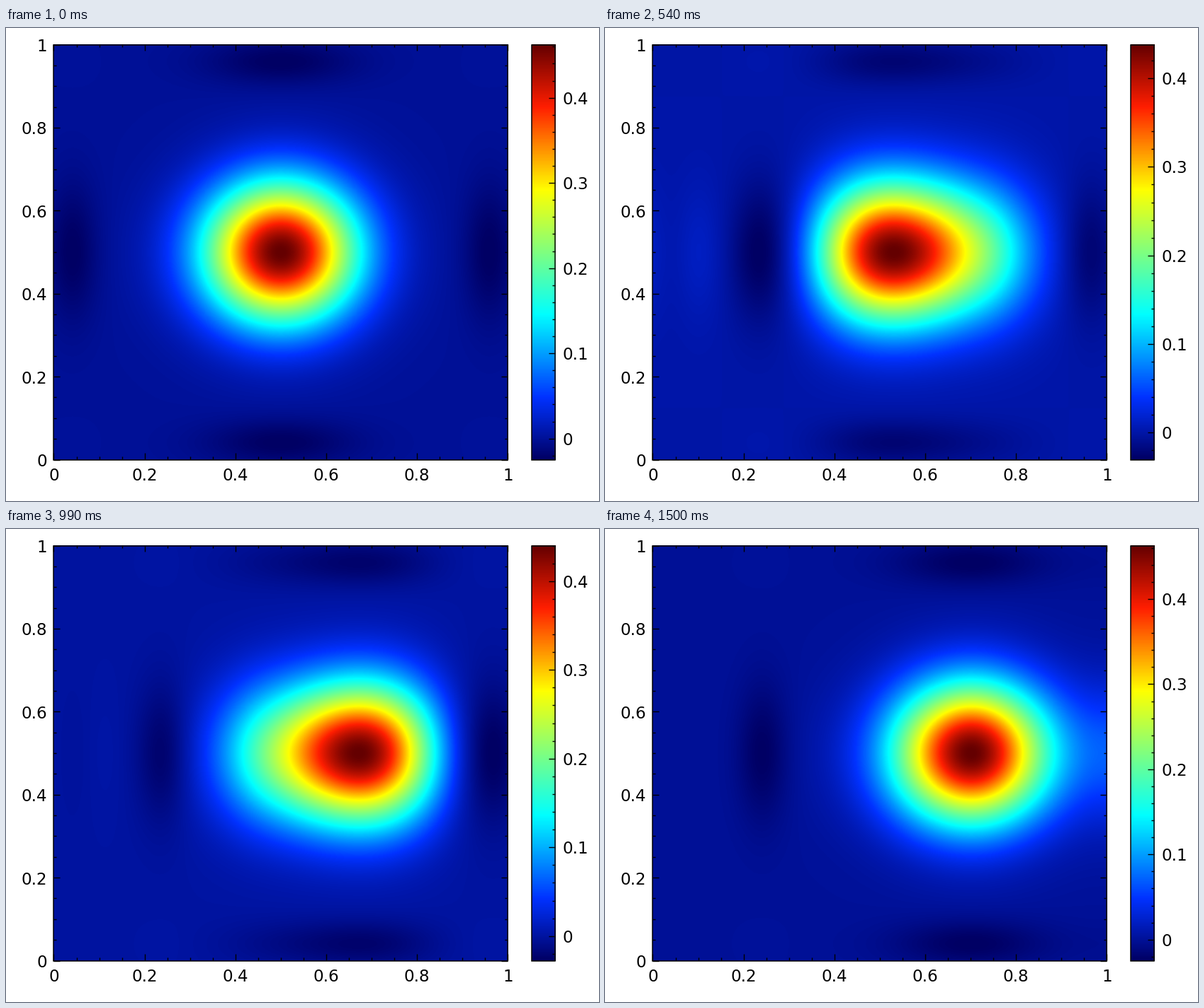
These frames come from a looping animation (837 by 669 pixels, 1530 ms). A matplotlib script:

```python
import numpy as np
import matplotlib.pyplot as plt
from matplotlib.animation import FuncAnimation
from matplotlib.collections import LineCollection
from matplotlib.colors import LinearSegmentedColormap
from matplotlib.patches import Rectangle

W, H, DPI = 837, 669, 64
PX = 72 / DPI                       # one pixel in points
LEFT, RIGHT, TOP, BOTTOM = 67, 708, 23, 610
BAR_L, BAR_R = 742, 775
TICKS, PICTURES = 51, 33
SPACING, AMPLITUDE = 0.2, 0.68

# Pictures are held for one or two ticks of 30 ms.
STARTS = np.maximum(0, np.floor(np.arange(PICTURES) * 19 / 12 - 0.2))

JET = LinearSegmentedColormap.from_list("jet_soft", [
    (0.00, (0, 0, 100 / 255)),
    (0.15, (0, 50 / 255, 1)),
    (0.35, (0, 1, 1)),
    (0.65, (1, 1, 0)),
    (0.85, (1, 30 / 255, 0)),
    (1.00, (100 / 255, 0, 0)),
], N=350)


def cells(n):
    return (np.arange(n) + 0.5) / n


def hill(x, centre):
    """Bell curve with a shallow dip on either side."""
    d = np.abs(x - centre)
    return np.exp(-d**2 / 0.0274) - 0.054 * np.exp(-((d - 0.458) / 0.056)**2)


def weight(s):
    """Share of a hill whose node is s spacings from the moving point."""
    if s < 1:
        return np.sinc(s)
    ring = int(s)
    if ring > 2:
        return 0
    return -0.2 * (-0.45)**(ring - 1) * np.sin(np.pi * (s - ring)**0.7)**3


def progress(k):
    z = k - 16.3
    return np.clip(0.5 + 0.024 * z + 0.11 * np.tanh(z / 2), 0, 1)


XS = cells(RIGHT - LEFT + 1)
Y = AMPLITUDE * hill(cells(BOTTOM - TOP + 1), 0.5)


def profile(k):
    u = progress(k)
    point = 0.5 + SPACING * u
    total = 0.2 * u**12 * hill(XS, 1.1)        # late rise at the right edge
    for node in 0.1 + SPACING * np.arange(6):
        total = total + weight(abs(node - point) / SPACING) * hill(XS, node)
    return AMPLITUDE * (1 + 0.02 * np.sin(np.pi * u)) * total


fig = plt.figure(figsize=(W / DPI, H / DPI), dpi=DPI, facecolor="white")
ax = fig.add_axes([0, 0, 1, 1])
ax.axis("off")


def picture(data, left, right):
    return ax.imshow(data, cmap=JET, extent=(left, right + 1, BOTTOM + 1, TOP),
                     aspect="auto", interpolation="nearest", zorder=1)


def lines(segments):
    return ax.add_collection(LineCollection(
        segments, colors="black", linewidths=1.4 * PX, zorder=3))


def label(x, y, text, align):
    return ax.text(x, y, text, ha=align, va="baseline", family="DejaVu Sans",
                   fontsize=23 * PX, color="black", zorder=4)


def frame(left, right):
    ax.add_patch(Rectangle((left + .5, TOP + .5), right - left, BOTTOM - TOP,
                           fill=False, ec="black", lw=1.5 * PX, zorder=3))


def height(part):
    return BOTTOM + .5 - (BOTTOM - TOP) * part


field = picture(np.outer(Y, XS), LEFT, RIGHT)
bar = picture(cells(BOTTOM - TOP + 1)[::-1, None], BAR_L, BAR_R)
bar.set_clim(0, 1)
ax.set_xlim(0, W)
ax.set_ylim(H, 0)
frame(LEFT, RIGHT)
frame(BAR_L, BAR_R)

marks = []
for j in range(21):
    size = 4 if j % 4 else 9
    x = LEFT + .5 + (RIGHT - LEFT) * j / 20
    y = height(j / 20)
    marks += [[(x, BOTTOM), (x, BOTTOM - size)], [(x, TOP), (x, TOP + size)],
              [(LEFT, y), (LEFT + size, y)], [(RIGHT, y), (RIGHT - size, y)]]
    if j % 4 == 0:
        label(x, 640.5, f"{j / 20:g}", "center")
        label(58, y + 9.5, f"{j / 20:g}", "right")
lines(marks)

bar_marks = lines([])
bar_labels = [label(785.5, 0, f"{j / 10:g}", "left") for j in range(5)]


def draw(n):
    k = np.searchsorted(STARTS, n, side="right") - 1
    z = np.outer(Y, profile(k))
    lo, hi = z.min(), z.max()
    field.set_data(z)
    field.set_clim(lo, hi)

    segments = []
    for j in range(int(np.ceil(lo / 0.02)), int(hi / 0.02) + 1):
        y = height((0.02 * j - lo) / (hi - lo))
        size = 4 if j % 5 else 9
        segments.append([(BAR_R, y), (BAR_R - size, y)])
        if j % 5 == 0:
            bar_labels[j // 5].set_y(y + 9)
    bar_marks.set_segments(segments)
    return [field, bar_marks, *bar_labels]


anim = FuncAnimation(fig, draw, frames=TICKS, interval=30, repeat=True,
                     repeat_delay=0, blit=False)
plt.show()
```
